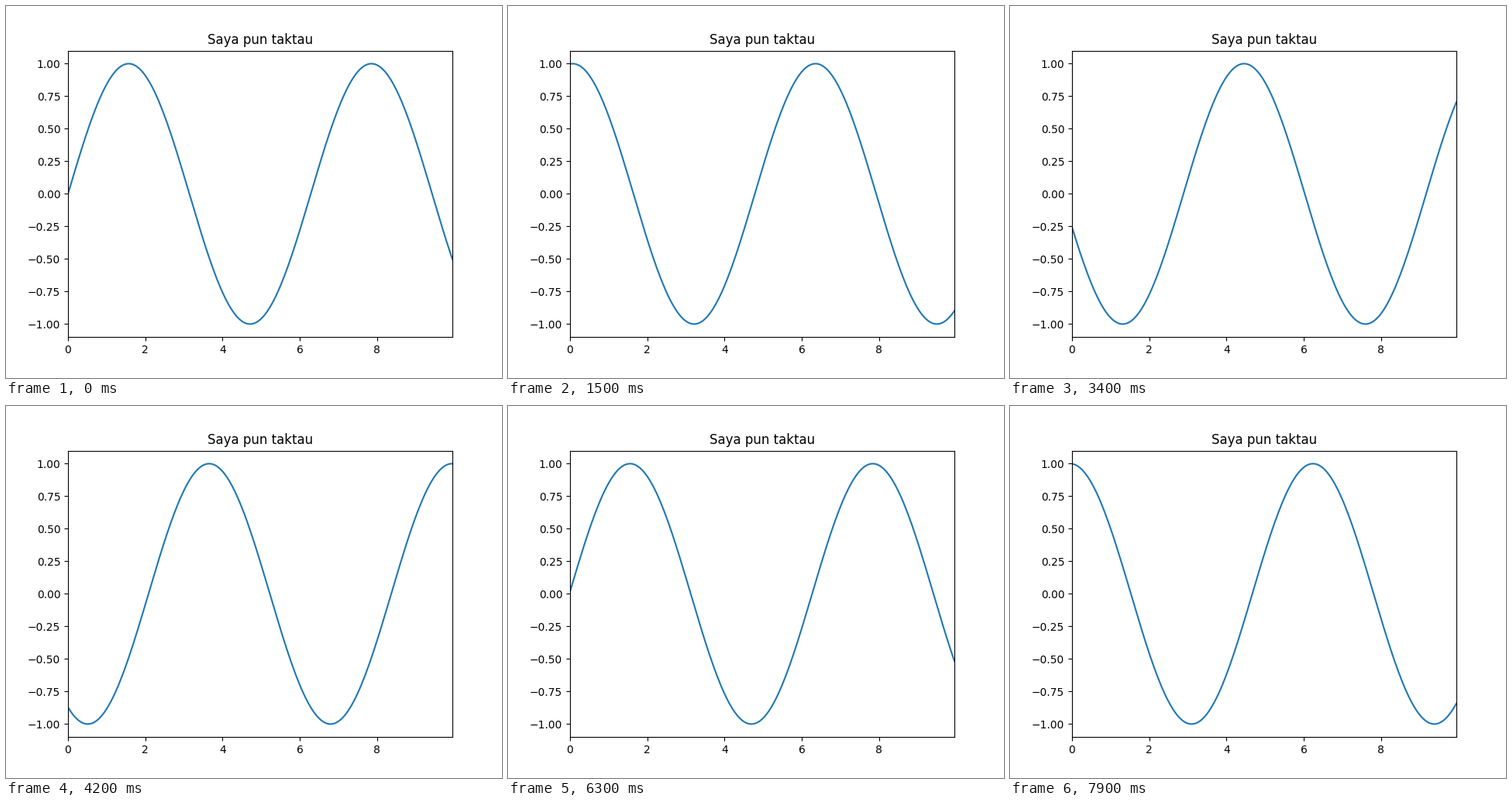
A matplotlib script that plays this animation: 640x480 px, repeating every 8 s.

```python
import numpy as np
import matplotlib.pyplot as plt
from matplotlib.animation import FuncAnimation

FRAMES = 80
INTERVAL = 100  # ms
PHASE_STEP = 0.1  # radians per frame

x = np.arange(0, 10, 0.05)

fig, ax = plt.subplots(figsize=(6.4, 4.8), dpi=100)
ax.set_title("Saya pun taktau")
ax.margins(x=0)
line, = ax.plot(x, np.sin(x))


def update(i):
    line.set_ydata(np.sin(x + PHASE_STEP * i))
    return line,


anim = FuncAnimation(fig, update, frames=FRAMES, interval=INTERVAL,
                     repeat=True, repeat_delay=0)
plt.show()
```
